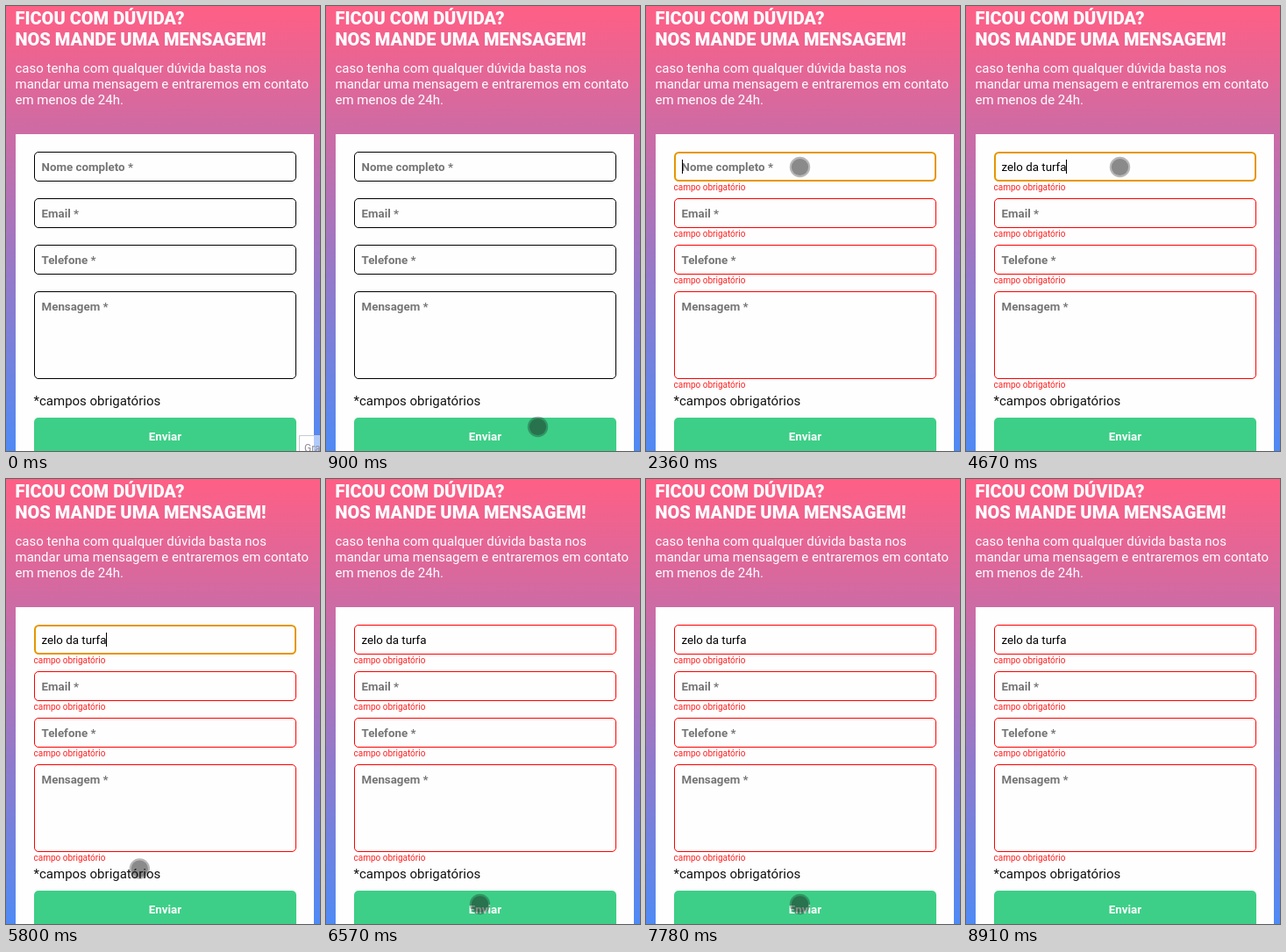
Recreate the animation shown at these times as an HTML page. Size 358x507 px, loop 9110 ms.

```html
<!DOCTYPE html>
<html lang="pt-BR">
<head>
<meta charset="utf-8">
<title>Formulário de contato</title>
<style>
  html, body { margin: 0; width: 100%; height: 100%; overflow: hidden; }
  svg { display: block; width: 100%; height: 100%; font-family: Roboto, Arial, sans-serif; }
  text { white-space: pre; }
  .title { font-size: 20px; font-weight: 900; fill: #fff; }
  .lead { font-size: 15px; fill: #fff; }
  .note { font-size: 15px; fill: #111; }
  .field { fill: none; stroke: #000; }
  .label { font-size: 13.333px; font-weight: 700; fill: #757575; }
  .typed { font-size: 13.333px; fill: #000; }
  .error { font-size: 10px; fill: #f22; visibility: hidden; }
  .invalid .field { stroke: #f00; }
  .invalid .error { visibility: visible; }
  .focus { fill: none; stroke: #e59700; stroke-width: 2; }
  .send { fill: #3dcf87; }
  .sendText { font-size: 13.333px; font-weight: 700; fill: #fff; text-anchor: middle; }
  .halo { fill: rgba(20, 20, 20, .3); }
  .dot { fill: rgba(20, 20, 20, .28); }
  .pressed .halo { fill: rgba(190, 200, 10, .62); }
  .pressed .dot { fill: rgba(125, 125, 0, .45); }
</style>
</head>
<body>
<svg viewBox="0 0 358 507">
  <defs>
    <linearGradient id="sky" x2="0" y2="1">
      <stop stop-color="#ff5f85"/>
      <stop offset="1" stop-color="#4f8af5"/>
    </linearGradient>
  </defs>
  <rect width="358" height="507" fill="url(#sky)"/>
  <text class="title" x="10.5" y="21">FICOU COM DÚVIDA?</text>
  <text class="title" x="10.5" y="45">NOS MANDE UMA MENSAGEM!</text>
  <text class="lead" x="10.5" y="76">caso tenha com qualquer dúvida basta nos</text>
  <text class="lead" x="10.5" y="94">mandar uma mensagem e entraremos em contato</text>
  <text class="lead" x="10.5" y="112">em menos de 24h.</text>
  <rect x="11" y="146" width="340" height="370" fill="#fefefe"/>
  <g id="form"></g>
  <rect id="focus" class="focus" x="33" y="167" width="297" height="32" rx="4.5"/>
  <text id="typed" class="typed" x="40.5" y="188"></text>
  <rect id="caret" y="175" width="1" height="16"/>
  <text class="note" x="31.5" y="455">*campos obrigatórios</text>
  <rect id="send" class="send" x="32" y="469" width="299" height="50" rx="5"/>
  <text class="sendText" x="181.5" y="495">Enviar</text>
  <g id="badge">
    <rect x="334.5" y="489.5" width="40" height="30" fill="#fff" fill-opacity=".55" stroke="#c9c9d2"/>
    <text x="340" y="508" font-size="12" fill="#948c98">Gra</text>
  </g>
  <g id="cursor">
    <circle class="halo" r="11.7"/>
    <circle class="dot" r="9.6"/>
  </g>
</svg>
<script>
const LOOP = 9110;
const NAME = 'zelo da turfa';
const $ = id => document.getElementById(id);

const fields = [
  ['Nome completo *', 166, 34],
  ['Email *', 219, 34],
  ['Telefone *', 272, 34],
  ['Mensagem *', 325, 100]
];
$('form').innerHTML = fields.map(([label, y, h]) => `
  <rect class="field" x="32.5" y="${y + .5}" width="298" height="${h - 1}" rx="4.5"/>
  <text class="label" x="40.5" y="${y + 22}">${label}</text>
  <text class="error" x="31.5" y="${y + h + 10}">campo obrigatório</text>`).join('');
const nameField = document.querySelector('.field');
const nameLabel = document.querySelector('.label');

// Time spans in ms
const PRESSES = [[1100, 1300], [2230, 2360], [6430, 6570], [6970, 7110], [7440, 7570], [7650, 7780]];
const CARET = [[2360, 2890], [3020, 5200], [5740, 6230]];
const FOCUS = [[2360, 6430]];
const SENDING = [[1100, 1600]];
const SHOWN = [[270, 8910]];
// One key press each
const KEYS = [3020, 3220, 3550, 3650, 3750, 3850, 3960, 4070, 4270, 4370, 4470, 4570, 4670];

const MOVES = [
  { from: 270, to: 900, steps: 10, path: [[321, 500], [290, 476], [262, 469], [241.5, 479.5]] },
  { from: 1560, to: 2030, steps: 8, path: [[239, 470], [216, 412], [184, 240], [175.5, 183.5]] },
  { from: 5140, to: 5940, steps: 12, path: [[170, 188], [110, 232], [46, 290], [90, 372], [150, 440], [175.5, 484.5]] },
  { from: 8640, to: 8910, steps: 5, path: [[177, 487], [205, 502], [230, 520]] }
];

const within = (spans, t) => spans.some(([a, b]) => t >= a && t < b);
const show = (el, on) => { el.style.visibility = on ? 'visible' : 'hidden'; };

function along(path, p) {
  const s = p * (path.length - 1);
  const i = Math.min(Math.floor(s), path.length - 2);
  const f = s - i;
  return [0, 1].map(k => path[i][k] + (path[i + 1][k] - path[i][k]) * f);
}

function cursorAt(t) {
  const move = MOVES.filter(m => t >= m.from).pop() || MOVES[0];
  const p = Math.max(0, Math.min(1, (t - move.from) / (move.to - move.from)));
  const last = move.steps - 1;
  return along(move.path, Math.floor(p * last + 1e-6) / last);
}

function draw(t) {
  const count = KEYS.filter(k => t >= k).length;
  const focused = within(FOCUS, t);
  const typed = $('typed');
  const text = NAME.slice(0, count);
  if (typed.textContent !== text) typed.textContent = text;
  $('caret').setAttribute('x', Math.floor(40.7 + (count ? typed.getComputedTextLength() : .3)));

  $('form').classList.toggle('invalid', t >= 1300);
  show($('badge'), t < 70);
  show($('focus'), focused);
  show(nameField, !focused);
  show(nameLabel, !count);
  show($('caret'), within(CARET, t));
  show($('cursor'), within(SHOWN, t));
  $('send').style.fill = within(SENDING, t) ? '#3bca8c' : '';
  $('cursor').classList.toggle('pressed', within(PRESSES, t));
  $('cursor').setAttribute('transform', `translate(${cursorAt(t)})`);
}

const start = performance.now();
function tick() {
  draw((performance.now() - start) % LOOP);
  requestAnimationFrame(tick);
}
tick();
</script>
</body>
</html>
```
